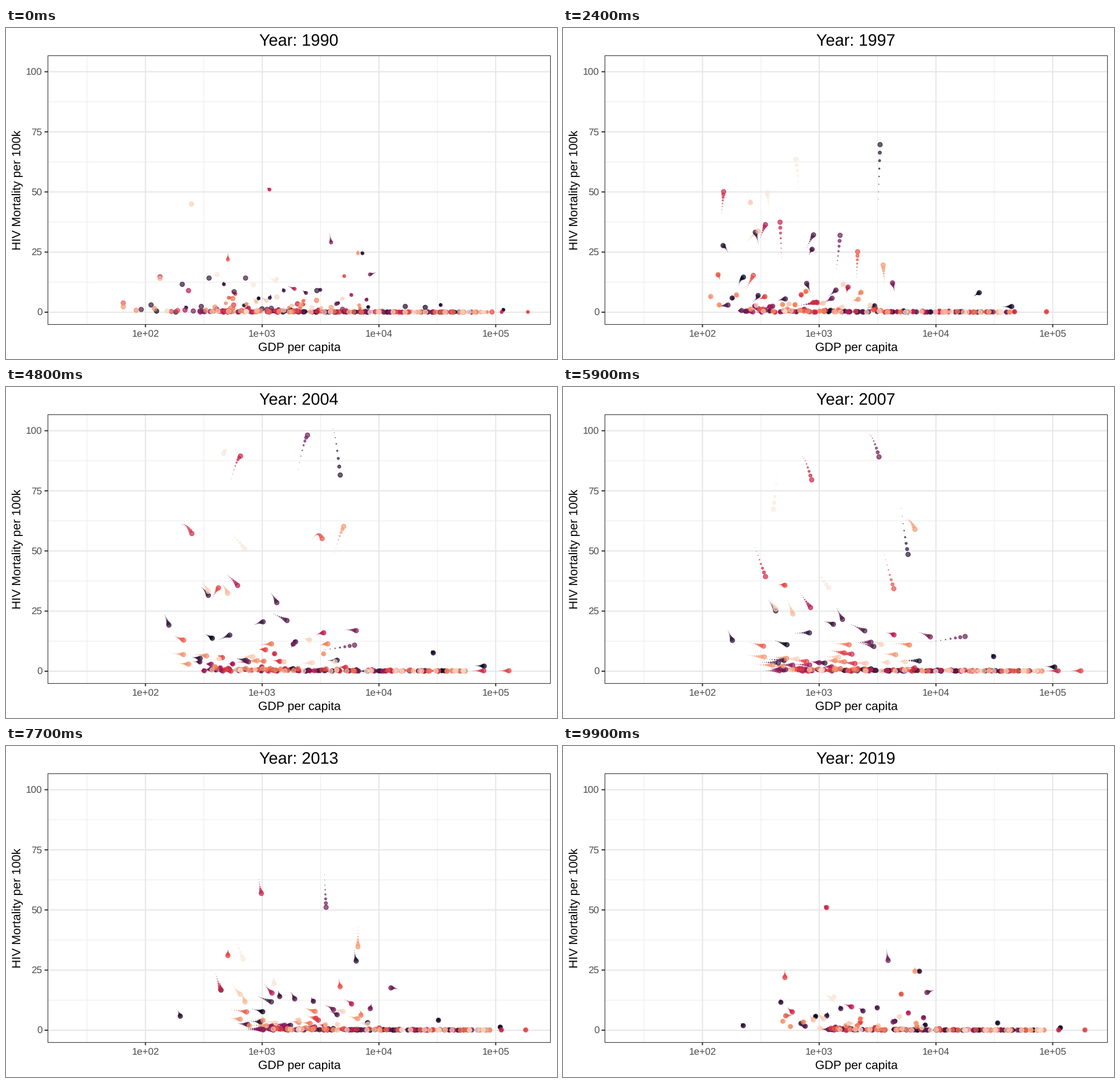
A matplotlib script that plays this animation: 966x580 px, repeating every 10 s.

```python
import numpy as np
import matplotlib.pyplot as plt
from matplotlib.animation import FuncAnimation
from matplotlib.colors import LinearSegmentedColormap
from matplotlib.patches import Rectangle

W, H, DPI = 966, 580, 100
FRAMES, WAKE = 100, 8
PT = 72 / DPI  # points per pixel
LEFT, RIGHT, TOP, BOTTOM = 73, 954, 48, 519

plt.rcParams["font.family"] = "Liberation Sans"
plt.rcParams["text.hinting"] = "none"
rocket = LinearSegmentedColormap.from_list("rocket", [
    "#03051A", "#35193E", "#701F57", "#AD1759",
    "#E13342", "#F37651", "#F6B48F", "#FAEBDD"])

fig = plt.figure(figsize=(W / DPI, H / DPI), dpi=DPI, facecolor="white")
ax = fig.add_axes([0, 0, 1, 1])
ax.set(xlim=(0, W), ylim=(H, 0))
ax.axis("off")


def x_at(log_gdp):
    return 244.5 + 204.67 * (log_gdp - 2)


def y_at(rate):
    return 498 - 4.214 * rate


def line(xs, ys, color, width):
    ax.plot(xs, ys, color=color, lw=width * PT, solid_capstyle="butt",
            snap=False, zorder=1)


def label(x, y, text, size, color="black", **kw):
    kw.setdefault("ha", "center")
    return ax.text(x, y, text, fontsize=size * PT, color=color,
                   va="baseline", **kw)


# Panel, grid and labels
for v in (1.5, 2.5, 3.5, 4.5):
    line([x_at(v)] * 2, [TOP, BOTTOM], "#EBEBEB", 1)
for v in (12.5, 37.5, 62.5, 87.5):
    line([LEFT, RIGHT], [y_at(v)] * 2, "#EBEBEB", 1)
for v in (2, 3, 4, 5):
    x = x_at(v)
    line([x, x], [TOP, BOTTOM], "#E6E6E6", 2)
    line([x, x], [BOTTOM, BOTTOM + 5.4], "#333333", 2)
    label(x, 541.6, f"1e+0{v}", 17.1, "#4D4D4D")
for v in (0, 25, 50, 75, 100):
    y = y_at(v)
    line([LEFT, RIGHT], [y, y], "#E6E6E6", 2)
    line([LEFT - 5.4, LEFT], [y, y], "#333333", 2)
    label(63.5, y + 6.1, str(v), 17.1, "#4D4D4D", ha="right")
ax.add_patch(Rectangle((LEFT, TOP), RIGHT - LEFT, BOTTOM - TOP, fill=False,
                       ec="#333333", lw=1.1 * PT, zorder=5))
label(514, 566, "GDP per capita", 21.3)
label(25.5, 283.5, "HIV Mortality per 100k", 21.3, rotation=90,
      rotation_mode="anchor")
title = label(513.7, 31, "", 28.9)

f = np.arange(FRAMES)[:, None]
LAST = FRAMES - 1


def sech(u):
    return 1 / np.cosh(u)


def epidemic(start, peak, end, at, rise=30, fall=23):
    """Rate that swells from start to its peak, then sinks to end."""
    rising = f < at
    width = np.where(rising, rise, fall)
    base = np.where(rising, start, end)
    edge = sech(np.where(rising, at, LAST - at) / width)
    bump = (sech((f - at) / width) - edge) / (1 - edge)
    return base + (peak - base) * bump


groups = []


def add(hue, x, rate):
    groups.append((np.atleast_1d(hue), x, y_at(rate)))


def country(hue, wealth, *wave, **widths):
    add(hue, np.interp(f, [0, 33, 59, LAST], wealth), epidemic(*wave, **widths))


# Countries that stand out: wealth on the stage, then start, peak, end, time
country(.12, (545, 560, 605, 625), 9, 102, 24.5, 39, rise=18, fall=11)
country(.29, (464, 494, 554, 570), .5, 99, 29, 50, rise=16, fall=17)
country(.51, (390, 377, 436, 462), .7, 90, 51, 50, rise=20, fall=11)
country(.64, (510, 519, 580, 593), .7, 57, 15, 45, rise=16, fall=10)
country(.8, (570, 558, 617, 617), 2, 63, 24.5, 53, rise=17, fall=13)
country(1, (434, 399, 369, 473), 11.4, 92, 12.8, 45, fall=16)
country(.99, (370, 354, 466, 475), 15.7, 58, 13.8, 39, rise=40, fall=15)
country(.93, (325, 330, 373, 457), 45, 47, 4.7, 14, fall=45)
country(.88, (270, 369, 403, 439), 14, 37, 4.3, 36, rise=40)
country(.53, (270, 286, 355, 402), 14.7, 61, 7.6, 42, rise=45, fall=16)
country(.62, (290, 350, 389, 389), .3, 36, 21.9, 54, rise=25, fall=40)
country(.45, (320, 368, 434, 506), 9, 41, 9.7, 36, rise=40, fall=20)
country(.15, (356, 330, 373, 382), 14.2, 36, 11.6, 34)
country(.2, (420, 443, 529, 551), 14.2, 26.5, 9.3, 28)
country(.21, (400, 454, 490, 526), 8.5, 34.5, 8, 32)
country(.13, (309, 270, 297, 316), 11.6, 28, 1.9, 27)
country(.17, (449, 419, 474, 487), 1.4, 20.6, 9, 50)
country(.28, (340, 483, 705, 638), .5, 17.6, 15.7, 77)
country(.32, (590, 573, 644, 632), 1.2, 17.2, 5.2, 43)
country(.08, (700, 741, 755, 762), 2.4, 8.8, 3, 33)

# The richest few
country(.04, (735, 806, 862, 872), 2, 2.4, 1, 33)
country(.52, (780, 796, 868, 869), .1, .2, .1, 33)
country(.61, (852, 846, 908, 915), .1, .2, .1, 33)

rng = np.random.default_rng(12)
KNOTS = [0, 16, 33, 48, 59, 77, LAST]


def drift(low, high, q):
    """Spread points between two moving limits, each with its own sway."""
    low, high = (np.interp(f, KNOTS, lim) for lim in (low, high))
    sway = sum(amp * np.sin(2 * np.pi * (f / period + rng.random(len(q))))
               for amp, period in ((6, 61), (4, 34), (2, 19)))
    return low + (high - low) * q + sway


def spread(n):
    return (np.arange(n) + rng.random(n)) / n


# Poorer countries with a modest epidemic
n = 30
peak = 3 + np.minimum(rng.exponential(4.5, n), 13)
add(rng.random(n),
    drift([190, 250, 265, 300, 345, 400, 385],
          [560, 540, 560, 590, 620, 640, 640], spread(n)),
    epidemic(peak * rng.uniform(0, .5, n), peak,
             peak * rng.uniform(.1, .5, n), rng.uniform(28, 58, n)))

# The rest glide along the baseline
n = 137
q = spread(n)
top = rng.exponential(.18, n) + (1 - q) ** 2 * rng.exponential(.7, n)
add(rng.random(n),
    drift([338, 312, 325, 348, 378, 446, 464],
          [828, 776, 790, 808, 838, 850, 847], q),
    epidemic(top * .4, np.minimum(top, 3), top * .4, rng.uniform(30, 65, n)))

hues, xs, ys = (np.concatenate(part, axis=-1) for part in zip(*groups))
places = np.stack([xs, ys], axis=2)
order = np.argsort(hues)
places, hues = places[:, order], hues[order]

# Wake: oldest and smallest dots lie underneath
ages = np.arange(WAKE - 1, -1, -1)
radius = np.repeat(.35 + 4.25 * (1 - ages / 10) ** 3, len(hues))
rim = np.minimum(1.3, radius * .35)
dots = ax.scatter(np.zeros(len(radius)), np.zeros(len(radius)),
                  s=((2 * radius - rim) * PT) ** 2, lw=rim * PT,
                  c=np.tile(rocket(hues), (WAKE, 1)), alpha=.7, zorder=4)


def update(i):
    dots.set_offsets(places[(i - ages) % FRAMES].reshape(-1, 2))
    title.set_text(f"Year: {round(1990 + 29 * i / LAST)}")
    return dots, title


anim = FuncAnimation(fig, update, frames=FRAMES, interval=100, repeat=True,
                     repeat_delay=0)
plt.show()
```
